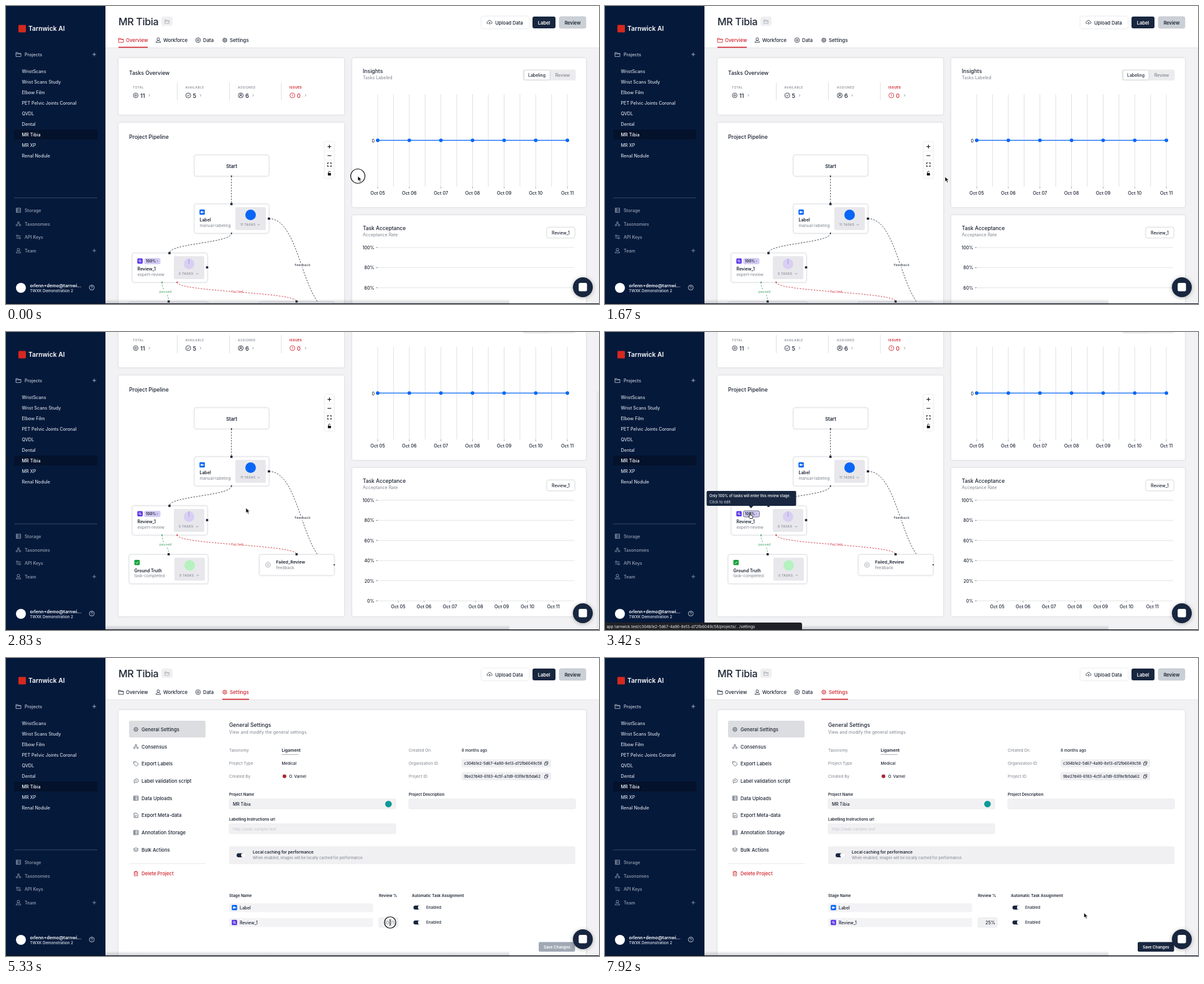
An HTML page that plays this animation: 954 px wide and 480 px high, repeating every 8000 ms.

```html
<!DOCTYPE html>
<html lang="en">
<head>
<meta charset="utf-8">
<title>Labeling project walkthrough</title>
<style>
html, body { margin: 0; width: 100%; height: 100%; overflow: hidden; background: #f2f2f4; }
svg { display: block; width: 954px; height: 480px; font-family: Inter, Lato, sans-serif; }
.card { fill: #fff; filter: drop-shadow(0 .5px 1.5px rgba(20, 30, 50, .17)); }
.node { fill: #fff; stroke: #dcdee2; stroke-width: .8; filter: drop-shadow(0 .5px 1px rgba(20, 30, 50, .14)); }
</style>
</head>
<body>
<svg id="stage" viewBox="0 0 954 480" xmlns="http://www.w3.org/2000/svg"></svg>
<script>
const LOOP = 8000, SCROLL = 118;
const INK = '#1b2433', GREY = '#7d838d', NAVY = '#18263f', RED = '#cf2029', BLUE = '#0a66f5';

// Drawing helpers; text is placed by its vertical middle.
const text = (x, y, s, size = 7, fill = INK, weight = 500, extra = '') =>
  `<text x="${x}" y="${y + size * .36}" font-size="${size}" fill="${fill}" font-weight="${weight}" ${extra}>${s}</text>`;
const mid = (x, y, s, size, fill, weight = 500) => text(x, y, s, size, fill, weight, 'text-anchor="middle"');
const end = (x, y, s, size, fill, weight = 500) => text(x, y, s, size, fill, weight, 'text-anchor="end"');
const box = (x, y, x2, y2, fill, r = 2, extra = '') =>
  `<rect x="${x}" y="${y}" width="${x2 - x}" height="${y2 - y}" rx="${r}" fill="${fill}" ${extra}/>`;
const panel = (cls, x, y, x2, y2, r = 3) => box(x, y, x2, y2, '#fff', r, `class="${cls}"`);
const dot = (x, y, r, fill, extra = '') => `<circle cx="${x}" cy="${y}" r="${r}" fill="${fill}" ${extra}/>`;
const line = (d, stroke, w = .8, extra = '') =>
  `<path d="${d}" fill="none" stroke="${stroke}" stroke-width="${w}" ${extra}/>`;
const group = (id, body, extra = '') => `<g id="${id}" ${extra}>${body}</g>`;
const range = n => [...Array(n).keys()];

const circlePath = (r, x = 0, y = 0) => `M${x - r} ${y}a${r} ${r} 0 1 1 ${2 * r} 0a${r} ${r} 0 1 1 ${-2 * r} 0`;
const ICONS = {
  folder: 'M-4-3h3l1 1.4h4v5h-8zM-4-1h8',
  plus: 'M-3 0h6M0-3v6',
  minus: 'M-3 0h6',
  next: 'M-1-1.7L.8 0L-1 1.7',
  down: 'M-1.7-.8L0 .9L1.7-.8',
  person: circlePath(2.1, 0, -1.7) + 'M-3.7 3.7c0-4 7.4-4 7.4 0z',
  target: circlePath(3.8) + circlePath(1.4),
  gear: circlePath(3) + circlePath(1.2) + 'M0-4v1M0 3v1M-4 0h1M3 0h1M-2.8-2.8l.7.7M2.1 2.1l.7.7M2.8-2.8l-.7.7M-2.1 2.1l-.7.7',
  check: circlePath(4) + 'M-1.9 0L-.5 1.5L2-1.5',
  user: circlePath(4) + circlePath(1.4, 0, -1) + 'M-2 2.5c0-3 4-3 4 0',
  alert: circlePath(4) + 'M0-2.2v2.8M0 1.5v.9',
  help: circlePath(4) + 'M-1.2-.8c0-2 2.4-1.8 2.4-.3c0 1-1.2 1-1.2 2M0 2v.6',
  cloud: 'M-2 2h-1c-2-.5-1.5-3.3.5-3.3c.6-3 4.6-2.7 4.9 0c2.2.2 2 3 .2 3.3h-.8M0 3.5V-.2M-1.3 1L0-.3L1.3 1',
  list: 'M-3.5-3.5h7v7h-7zM-3.5-1.2h7M-3.5 1.2h7M-1.8-3.5v7',
  nodes: circlePath(1.3, 0, -2.2) + circlePath(1.3, -2.5, 2) + circlePath(1.3, 2.5, 2) + 'M-.6-1L-2 .8M.6-1L2 .8',
  tag: 'M-3.5-3.5h3.5l4 4l-3.5 3.5l-4-4zM-2-2h.5',
  chat: 'M-2.5 3.5v-1.7c-3-5 6.5-7.500 6.500-2c0 2.500-3 2.600-4.500 2.300zM-1.500-.5h3',
  doc: 'M-3-3.5h4l2.300 2.300v4.700h-6.300zM-1.500.2h3M-1.500 1.800h2',
  layers: 'M-4-1.200L0-3.200L4-1.200L0 .8zM-4 1L0 3L4 1',
  trash: 'M-3.500-2.500h7M-1.200-2.500v-1.200h2.400v1.200M-2.700-2.500v6h5.400v-6M-.9-.8v2.600M.9-.8v2.600',
  keys: circlePath(1.300, -2.200, -1.800) + circlePath(1.300, 2.200, 1.800) + 'M-.9-1.800h4.500M.9 1.800h-4.500',
  frame: 'M-2.800-1v-1.800h1.800M1-2.800h1.800v1.800M2.800 1v1.800h-1.800M-1 2.800h-1.800v-1.800',
  copy: 'M-2.500-1h3.800v3.800h-3.800zM-1-1v-1.800h3.800v3.800h-1.500'
};
const icon = (name, x, y, color = INK, w = .8, k = 1) =>
  `<g transform="translate(${x} ${y}) scale(${k})">${line(ICONS[name], color, w)}</g>`;

function sidebar() {
  const soft = '#c3cad6', dim = '#98a2b3';
  const projects = ['WristScans', 'Wrist Scans Study', 'Elbow Film', 'PET Pelvic Joints Coronal', 'QVDL',
    'Dental', 'MR Tibia', 'MR XP', 'Renal Nodule'];
  const tools = [['list', 'Storage', 329], ['nodes', 'Taxonomies', 351], ['keys', 'API Keys', 372], ['person', 'Team', 394]];
  return box(0, 0, 160, 480, '#05193b', 0)
    + box(20, 30.5, 32, 42.5, '#d5291f', 1) + text(36, 36.5, 'Tarnwick AI', 10.3, '#fff', 600)
    + icon('folder', 20, 78, soft) + text(30, 78.5, 'Projects', 7.2, soft) + icon('plus', 142, 78, soft)
    + box(13, 199, 147, 215, '#04122b')
    + projects.map((s, i) => text(25.5, 105 + 17 * i, s, 7.2, i === 6 ? '#fff' : '#d5dae3')).join('')
    + line('M13 309h134', '#46546c')
    + tools.map(([ic, s, y]) => icon(ic, 20, y, dim) + text(30, y, s, 7.1, dim)).join('')
    + icon('plus', 142, 394, dim)
    + dot(24, 454, 8, '#fff') + text(38.5, 450, 'orlenn+demo@tarnwi...', 7.2, '#fff', 600)
    + text(38.5, 459, 'TWXK Demonstration 2', 6.2, '#e3e7ee') + icon('help', 138, 453.5, '#dfe3ea');
}

function header(active) {
  const tabs = [['folder', 'Overview', 185, 228], ['person', 'Workforce', 245, 293], ['target', 'Data', 309, 335], ['gear', 'Settings', 352, 391]];
  return box(160, 0, 954, 67, '#fff', 0) + line('M160 67.300h794', '#e3e4e8')
    + text(181, 25.5, 'MR Tibia', 16, INK, 500, 'letter-spacing="-.3"')
    + box(250, 17, 268, 32, '#efeff1', 4) + icon('folder', 259, 25, '#8b9099', .7, .85)
    + panel('card', 765, 17, 841, 36) + icon('cloud', 778, 26.5) + text(787, 27, 'Upload Data', 7.6)
    + box(847, 17, 884, 36, NAVY, 3) + mid(865.5, 27, 'Label', 7.5, '#fff', 600)
    + box(890, 17, 933, 36, '#cbd0d7', 3, 'stroke="#bfc5cd" stroke-width=".6"') + mid(911.5, 27, 'Review', 7.4, INK, 600)
    + tabs.map(([ic, s, x, x2]) => {
      const on = s === active, c = on ? RED : INK;
      return icon(ic, x, 55, c) + text(x + 8, 55.3, s, 7.8, c) + (on ? box(x - 4, 65.7, x2, 67.3, RED, 0) : '');
    }).join('');
}

function tasksCard() {
  const stats = [['TOTAL', 204, 'target', '11', 230.5], ['AVAILABLE', 288.5, 'check', '5', 313],
    ['ASSIGNED', 373, 'user', '6', 397.5], ['ISSUES', 456, 'alert', '0', 482]];
  return panel('card', 181, 84, 544, 175) + text(198, 107.5, 'Tasks Overview', 8.6)
    + stats.map(([s, x, ic, n, cx], i) => {
      const c = i === 3 ? RED : INK;
      return text(x, 131, s, 4.9, i === 3 ? RED : GREY, i === 3 ? 700 : 500, 'letter-spacing=".45"')
        + icon(ic, x + 4.7, 144, c) + text(x + 12, 144.2, n, 9.2, c) + icon('next', cx, 144, GREY);
    }).join('')
    + [275.5, 359.5, 443].map(x => line(`M${x} 123v29`, '#d6d8dc')).join('');
}

const port = (x, y, c = INK) => box(x - 1.8, y - 1.8, x + 1.8, y + 1.8, c, .5);
const dash = (d, c) => line(d, c, .8, 'stroke-dasharray="2.5 2"');
const mono = (x, y, s, c) => `<g font-family="'Liberation Mono', monospace">${
  box(x - s.length * 1.6, y - 3.5, x + s.length * 1.6, y + 3.5, '#fff', 0)}${mid(x, y, s, 5.4, c, 400)}</g>`;
const drop = (x, y, x2, y2) => `M${x} ${y}C${x} ${(y + y2) / 2} ${x2} ${(y + y2) / 2} ${x2} ${y2}`;
const badge = (x, y, c) => box(x, y, x + 8.6, y + 8.6, c, 1.5);
const videoBadge = (x, y) => badge(x, y, BLUE) + box(x + 2, y + 2.9, x + 5.3, y + 5.8, '#fff', .6)
  + `<path d="M${x + 5.4} ${y + 4.3}l1.600-1.200v2.500z" fill="#fff"/>`;
const searchBadge = (x, y) => badge(x, y, '#5b35e8') + line(circlePath(1.5, x + 4, y + 4) + `M${x + 5} ${y + 5}l1.500 1.500`, '#fff', .9);
const checkBadge = (x, y) => badge(x, y, '#17a33c') + line(`M${x + 2.2} ${y + 4.4}l1.500 1.500l2.700-3`, '#fff', .9);

function stage(x, y, x2, y2, name, kind, count, color) {
  const gx = x2 - 54, tx = x + 8.5;
  return panel('node', x, y, x2, y2) + text(tx, y + 26, name, 6.9, INK, 600) + text(tx, y + 34.6, kind, 6.6, GREY, 400)
    + box(gx, y + 5, gx + 49, y + 42, '#e8e8ec', 2) + dot(gx + 24.5, y + 17.5, 8.5, color)
    + text(gx + 8, y + 33.3, count + ' TASKS', 5, GREY, 500, 'letter-spacing=".35"') + icon('down', gx + 37.5, y + 33.3, GREY);
}

function pipelineCard() {
  const green = '#3aa05c', controls = ['plus', 'minus', 'frame'];
  return panel('card', 181, 188, 544, 576) + text(198, 210.7, 'Project Pipeline', 8.6)
    + panel('card', 513, 219, 527.5, 277, 1)
    + controls.map((s, i) => icon(s, 520.3, 226.5 + 14.5 * i, '#111', 1.1)
      + line(`M513 ${233.5 + 14.5 * i}h14.500`, '#e6e6e9', .6)).join('')
    + box(517.8, 269, 522.8, 273, '#111', .7) + line('M518.800 269v-1.500c0-1.800 3-1.800 3 0', '#111', .9)
    + dash('M423 342.500C475.500 342.500 475.500 493 528 493', INK)
    + panel('node', 303, 240, 423, 274) + mid(363, 258, 'Start', 7.5, INK, 600)
    + stage(303, 319, 423, 366, 'Label', 'manual-labeling', '11', BLUE) + videoBadge(311.3, 327.7)
    + stage(203, 398, 324, 445, 'Review_1', 'expert-review', '0', '#d8cff3') + searchBadge(211.3, 406.5)
    + line('M294.300 415.500v-8.500', '#9b8bdc') 
    + box(222.5, 406, 248.5, 416, '#d5cdf4', 2.5, 'id="pill"') + text(225, 411.3, '100%', 5.9, INK, 600) + icon('next', 243.5, 411, '#6b62a0', .7)
    + stage(198, 476.5, 325, 523.5, 'Ground Truth', 'task-completed', '0', '#b5f2bf') + checkBadge(206.5, 485)
    + panel('node', 407.5, 476.5, 528, 510)
    + dot(421.5, 493, 4.2, '#ececef', 'stroke="#b5b8be" stroke-width=".8"') + line('M419.500 491l4 4M423.500 491l-4 4', '#b5b8be', .6)
    + text(434.5, 489, 'Failed_Review', 6.8, INK, 600) + text(434.5, 497.7, 'feedback', 6.6, GREY, 400)
    + dash('M362.700 274v45', INK) + dash(drop(362.7, 366, 263, 398), INK)
    + dash(drop(251, 445, 261.7, 476), green) + dash(drop(275.3, 445, 467.5, 476), RED)
    + mono(477, 417.5, 'feedback', INK) + mono(256.5, 460.5, 'passed', green) + mono(371.5, 460.5, 'failed', RED)
    + dot(362.7, 274, 1.1, INK) + dot(362.7, 366, 1.1, INK) + dot(251, 445, 1.1, green) + dot(275.3, 445, 1.1, RED) + dot(528, 493, 1.1, INK)
    + [[362.7, 319], [423, 342.5], [263, 398], [323.5, 421], [261.7, 476], [467.5, 476]].map(p => port(...p)).join('');
}

const day = i => 'Oct ' + String(5 + i).padStart(2, '0');

function chartCards() {
  const step = 50.85;
  return panel('card', 557, 84, 933, 324) + text(574, 105, 'Insights', 8.6) + text(574, 115.7, 'Tasks Labeled', 7, GREY, 400)
    + box(831.5, 102.5, 916.5, 120, '#ececee', 3) + panel('card', 834, 104, 874.5, 118.5, 2)
    + mid(854, 111.7, 'Labeling', 6.9, INK) + mid(895.5, 111.7, 'Review', 6.9, GREY)
    + range(13).map(i => line(`M${598 + i * step / 2} 142v149`, '#d9dadd', .8)).join('')
    + line(`M598 216.300h${step * 6}`, BLUE, 1.3) + end(593, 217, '0', 7, INK)
    + range(7).map(i => dot(598 + i * step, 216.3, 2.9, BLUE) + line(`M${598 + i * step} 291v3`, '#888', .7)
      + mid(598 + i * step, 301, day(i), 7.3, INK)).join('')
    + panel('card', 557, 337, 933, 576) + text(574, 357.5, 'Task Acceptance', 8.4) + text(574, 368, 'Acceptance Rate', 7, GREY, 400)
    + panel('node', 870, 356.5, 915, 373.5) + mid(892.5, 365.2, 'Review_1', 6.9, INK)
    + range(6).map(i => end(592.5, 389.5 + 32.4 * i, 100 - 20 * i + '%', 7, INK)
      + line(`M598 ${389 + 32.4 * i}h316`, '#dcdde0') + line(`M595 ${389 + 32.4 * i}h3`, '#777')).join('')
    + range(7).map(i => mid(631 + 41.6 * i, 560.7, day(i), 7.3, INK)
      + line(`M${631 + 41.6 * i} 551v2.500`, '#888', .7)).join('');
}

const toggle = (x, y) => box(x, y - 3.2, x + 13.5, y + 3.2, NAVY, 3.2) + dot(x + 10.7, y, 3.4, '#fff');

function settingsPage() {
  const menu = [['gear', 'General Settings'], ['nodes', 'Consensus'], ['tag', 'Export Labels'], ['chat', 'Label validation script'],
    ['list', 'Data Uploads'], ['doc', 'Export Meta-data'], ['list', 'Annotation Storage'], ['layers', 'Bulk Actions']];
  const field = '#f1f1f3', edge = 'stroke="#e6e7ea" stroke-width=".7"';
  const label = (x, y, s) => text(x, y, s, 6.5, GREY, 400);
  const head = (x, y, s) => text(x, y, s, 6.2, INK, 600);
  const id = (y, s) => box(733, y - 6.5, 877, y + 6.5, '#efeff2', 3) + text(737, y, s, 6) + icon('copy', 869, y, INK, .7);
  return panel('card', 181, 84, 933, 490)
    + box(198, 101, 321, 128, '#dcdde0') + box(198, 267.5, 321, 294.5, '#e2e3e5', 2, 'id="hover"')
    + menu.map(([ic, s], i) => icon(ic, 209, 115 + 27.7 * i, '#4b5361') + text(218, 115.2 + 27.7 * i, s, 7.7)).join('')
    + line('M198 331h123', '#e1e2e5') + icon('trash', 209, 347.3, RED) + text(218, 347.5, 'Delete Project', 7.7, RED)
    + text(359, 107.5, 'General Settings', 8.5) + text(359, 119, 'View and modify the general settings.', 7.1, GREY, 400)
    + label(359, 148.3, 'Taxonomy') + text(443.5, 148.5, 'Ligament', 6.8, INK, 600)
    + line('M443.500 155.500h27', '#8b929e', .7)
    + label(359, 170, 'Project Type') + text(443.5, 170, 'Medical', 6.3)
    + label(359, 190.5, 'Created By') + dot(448, 190.5, 3, '#a52a38') + text(455.5, 190.7, 'O. Varnel', 6.3)
    + label(648, 148.3, 'Created On') + text(733, 148.3, '8 months ago', 6.3)
    + label(648, 170, 'Organization ID') + id(169.7, 'c304b1e2-5d67-4a90-8e13-d72fb6049c58')
    + label(648, 190.5, 'Project ID') + id(190.5, '9be27d40-6183-4c5f-a7d9-03f8e1b5da62')
    + head(359, 220, 'Project Name') + box(359, 227, 627, 243, field, 2, edge) + text(365, 235.5, 'MR Tibia', 6.9) + dot(615.3, 235.3, 5.3, '#0d9a97')
    + head(648, 220, 'Project Description') + box(648, 227, 916, 243, field, 2, edge)
    + head(359, 260, 'Labelling Instructions url') + box(359, 267, 627, 283, field, 2, edge) + text(365, 275.3, 'http://web.sample.test', 6.6, '#c4c6cb', 400)
    + box(359, 303.5, 916, 332, '#f0f0f2', 2) + toggle(371, 317.7)
    + text(397, 313, 'Local caching for performance', 6.6, INK, 600)
    + text(397, 322.3, 'When enabled, images will be locally cached for performance.', 6.05, GREY, 400)
    + head(359, 382.7, 'Stage Name') + head(600, 382.7, 'Review %') + head(653, 382.7, 'Automatic Task Assignment')
    + ['Label', 'Review_1'].map((s, i) => {
      const y = 402 + 24 * i;
      return box(359, y - 7, 590.5, y + 7.3, '#f3f3f5') + (i ? searchBadge : videoBadge)(363.2, y - 4.3)
        + text(376, y + .2, s, 6.9) + toggle(655.5, y) + text(676, y, 'Enabled', 6.3);
    }).join('')
    + box(600, 418.3, 631, 433.7, '#f1f1f3', 2, 'id="percent"')
    + box(609, 421, 621, 431, '#b4d5fe', 0, 'id="selection"')
    + end(628, 426.2, '<tspan id="value">100</tspan>%', 7.2, INK)
    + line('M0 421.500v9', INK, .8, 'id="caret"')
    + box(857, 457.5, 915.5, 473, NAVY, 2, 'id="save"') + mid(886.3, 465.3, 'Save Changes', 6.2, '#fff', 600);
}

const cursors = {
  arrow: '<path d="M0 0v8l2-1.800l1.400 3.200l1.500-.7l-1.400-3h2.700z" fill="#000" stroke="#fff" stroke-width=".7"/>',
  hand: '<path d="M-1 .8c0-1.200 1.500-1.200 1.500 0v2.700l2.700.7c.8.2 1 .7.9 1.500l-.5 3.300h-4l-2.300-3.200c-.5-1 .5-1.400 1.700-.2z" fill="#fff" stroke="#000" stroke-width=".8"/>',
  beam: '<path d="M-1.500-4.500q1.500 0 1.500 1q0-1 1.500-1M0-3.500v7M-1.500 4.500q1.500 0 1.500-1q0 1 1.500 1" fill="none" stroke="#000" stroke-width=".8"/>'
};

document.getElementById('stage').innerHTML =
  '<defs><linearGradient id="fade" x2="0" y2="1"><stop stop-color="#445" stop-opacity="0"/><stop offset="1" stop-color="#445" stop-opacity=".28"/></linearGradient></defs>'
  + box(0, 0, 954, 480, '#f2f2f4', 0)
  + group('overview', header('Overview') + tasksCard() + pipelineCard() + chartCards())
  + group('settings', header('Settings') + settingsPage())
  + box(160, 472, 810, 480, 'url(#fade)', 0) + sidebar()
  + box(0, 479, 954, 480, '#0b1220', 0)
  + box(950, 95, 953.5, 479, '#6c6e73', 1.7, 'id="scrollbar"')
  + dot(928, 453, 16, NAVY, 'style="filter:drop-shadow(0 1px 3px rgba(0,0,0,.3))"') + box(921.3, 446, 934.7, 459.5, '#fff', 2.5)
  + group('tooltip', box(163.5, 256, 307.5, 280, NAVY) + '<path d="M231 279.500h8l-4 4.500z" fill="#18263f"/>'
    + text(168, 263.5, 'Only 100% of tasks will enter this review stage.', 5.8, '#fff') + text(168, 273.5, 'Click to edit', 6.1, '#d2d7e0', 400))
  + group('status', box(-3, 468, 317, 483, '#202126', 3)
    + text(2.5, 474.3, 'app.tarnwick.test/c304b1e2-5d67-4a90-8e13-d72fb6049c58/projects/.../settings', 6.2, '#f2f2f2', 400))
  + dot(0, 0, 10, 'rgba(255,255,255,.45)', 'id="ring" stroke="#111" stroke-width="1.200"')
  + Object.entries(cursors).map(([k, d]) => group(k, d)).join('');

const $ = id => document.getElementById(id);
const set = (id, attrs) => { for (const k in attrs) $(id).setAttribute(k, attrs[k]); };
const show = (id, on) => set(id, { opacity: +on });
const between = (t, a, b) => t >= a && t < b;
const ramp = (t, a, b) => Math.min(1, Math.max(0, (t - a) / (b - a)));
const smooth = u => u * u * (3 - 2 * u);

// Pointer stops: time, x, y
const PATH = [[0, 566, 274], [250, 566, 274], [700, 547, 275], [2500, 547, 275], [3150, 233.5, 291.5], [4200, 233.5, 291.5],
  [4420, 590, 361], [4790, 590, 361], [5080, 618, 426], [7290, 618, 426], [7500, 775, 411], [7850, 775, 411], [7920, 770.5, 410.5], [8000, 770.5, 410.5]];
// Click rings: start, end, first radius, last radius
const CLICKS = [[0, 160, 11.5, 8], [3470, 3640, 11.5, 8], [5230, 5430, 11, 7.5]];

function pointer(t) {
  const i = Math.max(1, PATH.findIndex(p => p[0] > t));
  const [t0, x0, y0] = PATH[i - 1], [t1, x1, y1] = PATH[i], u = smooth(ramp(t, t0, t1));
  return [x0 + (x1 - x0) * u, y0 + (y1 - y0) * u];
}

function draw(t) {
  const inSettings = t >= 3670;
  set('overview', {
    transform: `translate(0 ${-SCROLL * (1 - (1 - ramp(t, 1700, 1990)) ** 3)})`,
    visibility: inSettings ? 'hidden' : 'visible'
  });
  set('settings', { visibility: inSettings ? 'visible' : 'hidden' });
  set('scrollbar', { opacity: ramp(t, 1740, 1790) * (1 - ramp(t, 2600, 2850)) });

  const onPill = between(t, 3080, 3670);
  set('tooltip', { opacity: onPill ? ramp(t, 3150, 3300) : 0 });
  set('pill', { stroke: onPill ? '#6d7390' : 'none', 'stroke-width': 1 });
  set('status', { opacity: ramp(t, 3160, 3320) * (1 - ramp(t, 3750, 3980)) });
  show('hover', between(t, 3670, 4250));

  const focused = between(t, 5450, 7750);
  set('percent', { stroke: focused ? '#8fb4e8' : '#e4e5e8', 'stroke-width': focused ? 1.2 : .7 });
  $('value').textContent = t < 6330 ? '100' : t < 6830 ? '2' : '25';
  show('selection', between(t, 6000, 6330));
  const typing = t >= 6330;
  set('caret', { transform: `translate(${typing ? 622 : 614.5} 0)` });
  show('caret', focused && (typing ? (t - 6330) % 1000 < 500 : t < 5670));
  set('save', { fill: typing ? NAVY : '#a1a8b4' });

  const [x, y] = pointer(t);
  const shape = between(t, 3080, 4240) ? 'hand' : between(t, 5040, 6000) ? 'beam' : between(t, 6000, 7330) ? '' : 'arrow';
  for (const k in cursors) {
    set(k, { transform: `translate(${x} ${y})` });
    show(k, k === shape);
  }
  const click = CLICKS.find(c => between(t, c[0], c[1]));
  show('ring', !!click);
  if (click) set('ring', { cx: x, cy: y, r: click[2] + (click[3] - click[2]) * ramp(t, click[0], click[1]) });
}

const start = performance.now();
function tick() {
  draw((performance.now() - start) % LOOP);
  requestAnimationFrame(tick);
}
tick();
</script>
</body>
</html>
```
